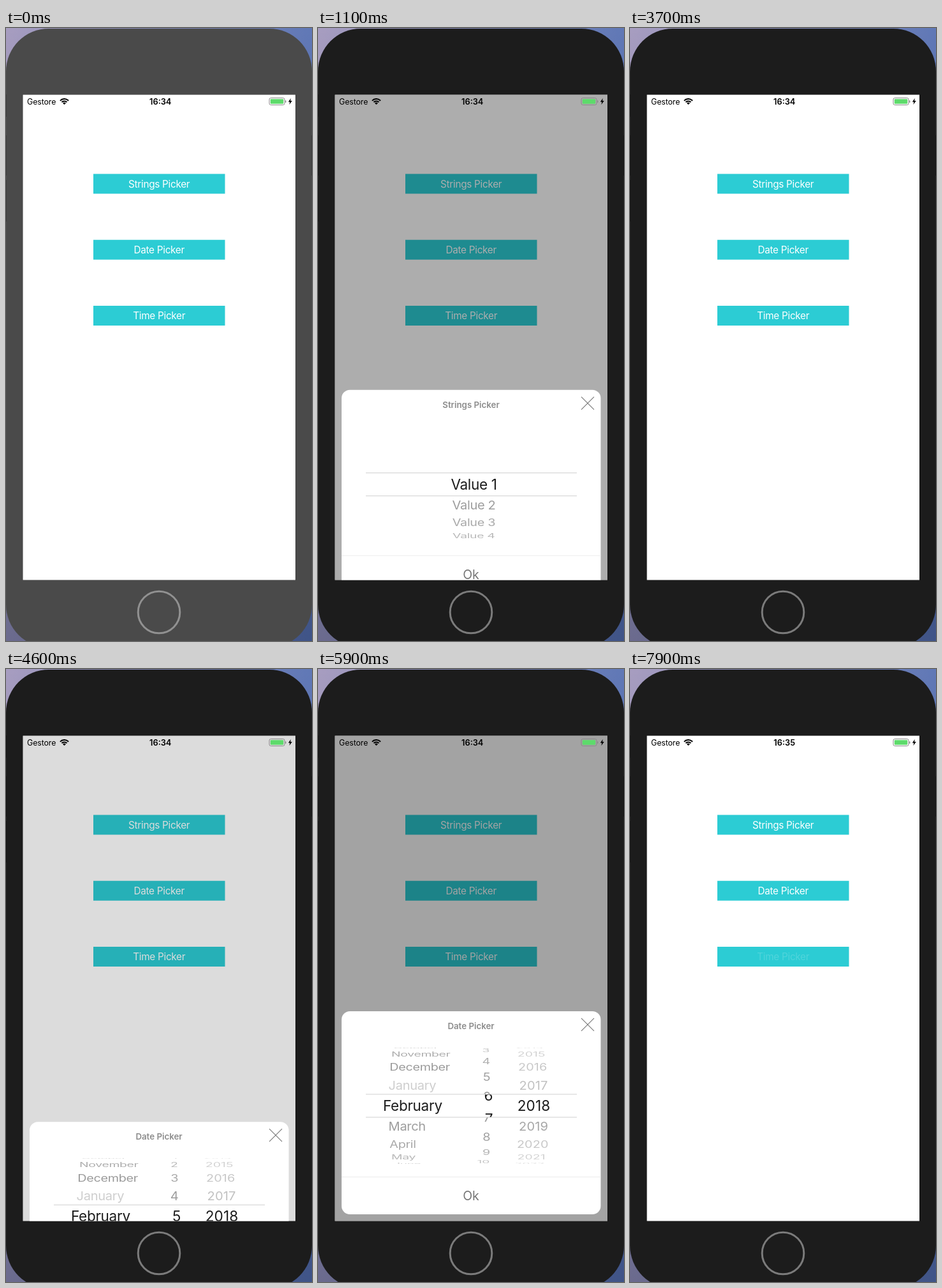
Recreate the animation shown at these times as an HTML page with a canvas. Size 480 px wide and 960 px high, loop 8 s.

```html
<!DOCTYPE html>
<html lang="it">
<head>
<meta charset="utf-8">
<title>Pickers</title>
<style>
html, body { margin: 0; width: 100%; height: 100%; overflow: hidden; }
canvas { display: block; width: 480px; height: 960px; }
</style>
</head>
<body>
<canvas id="stage"></canvas>
<script>
const LOOP = 8000, SLIDE = 328, DIM = 0.361;
const FONT = 'Inter, "Liberation Sans", sans-serif';
const MONTHS = ['January', 'February', 'March', 'April', 'May', 'June', 'July',
  'August', 'September', 'October', 'November', 'December'];

const canvas = document.getElementById('stage');
const ctx = canvas.getContext('2d');
const ratio = window.devicePixelRatio || 1;
canvas.width = 480 * ratio;
canvas.height = 960 * ratio;

const clamp = u => Math.min(1, Math.max(0, u));
const ease = u => 0.5 - 0.5 * Math.cos(Math.PI * clamp(u));
const tween = (t, from, to) => ease((t - from) / (to - from));
const wrap = (i, n) => ((i % n) + n) % n;

// x: column anchor, lens: anchor inside the selection band
const valueCol = {
  x: 244.5, lens: 244.5, align: 'center', spacing: -0.35,
  label: i => i >= 1 && i <= 4 ? 'Value ' + i : '',
  color: () => '#999'
};
const monthCol = {
  x: 110, lens: 102, align: 'left', spacing: -0.35,
  label: i => MONTHS[wrap(i, 12)],
  color: i => i === 0 ? '#ccc' : i < 0 ? '#888' : '#999'
};
const dayCol = {
  x: 271, lens: 274.5, align: 'right', spacing: 0,
  label: i => String(wrap(i - 1, 31) + 1),
  color: () => '#999'
};
const yearCol = {
  x: 338.5, lens: 338.5, align: 'center', spacing: 0.1,
  label: i => String(i),
  color: i => i === 2019 ? '#a2a2a2' : '#bebebe'
};

const buttons = [
  { text: 'Strings Picker', y: 228.5, down: 520, up: 720 },
  { text: 'Date Picker', y: 331.8, down: 4050, up: 4270 },
  { text: 'Time Picker', y: 435, down: 7770, up: 9000 }
];

const sheets = [
  { title: 'Strings Picker', open: 700, close: 3180,
    wheels: t => [[valueCol, 1 + 2 * tween(t, 2080, 2580)]] },
  { title: 'Date Picker', open: 4360, close: 6865,
    wheels: t => [[monthCol, 1], [dayCol, 5 + 2 * tween(t, 5450, 6150)], [yearCol, 2018]] }
];

function box(x, y, w, h, color, radius = 0) {
  ctx.fillStyle = color;
  ctx.beginPath();
  ctx.roundRect(x, y, w, h, radius);
  ctx.fill();
}

function clipBox(x, y, w, h) {
  ctx.beginPath();
  ctx.rect(x, y, w, h);
  ctx.clip();
}

// Text whose capitals are centred on y
function text(str, x, y, size, color, { weight = 400, align = 'center', spacing = 0 } = {}) {
  ctx.font = `${weight} ${size}px ${FONT}`;
  ctx.letterSpacing = spacing + 'px';
  ctx.textAlign = align;
  ctx.textBaseline = 'alphabetic';
  ctx.fillStyle = color;
  ctx.fillText(str, x, y + size * 0.364);
}

function backdrop() {
  const across = ctx.createLinearGradient(0, 0, 480, 0);
  across.addColorStop(0, '#a79dc0');
  across.addColorStop(1, '#6078b6');
  box(0, 0, 480, 960, across);
  const down = ctx.createLinearGradient(0, 0, 0, 960);
  down.addColorStop(0, 'rgba(10,25,60,0)');
  down.addColorStop(1, 'rgba(10,25,60,.38)');
  box(0, 0, 480, 960, down);
}

function phone(t) {
  const active = t >= 500;
  box(0, 1, 480, 969, active ? '#1c1c1c' : '#4a4a4a', 67);
  for (const [x, y, h] of [[0, 104, 35], [0, 168, 63], [0, 238, 65], [479, 168, 63]])
    box(x, y, 1, h, active ? '#111' : '#3a3a3a');
  ctx.strokeStyle = active ? '#7b7b7b' : '#919191';
  ctx.lineWidth = 3;
  ctx.beginPath();
  ctx.arc(240, 915, 32.8, 0, Math.PI * 2);
  ctx.stroke();
  box(26, 104, 428.5, 761, active ? '#111' : '#333');
  box(26.5, 104.5, 427.5, 760, '#fff');
}

function button(b, t) {
  box(137, b.y, 206.5, 31, '#2cccd4');
  const press = clamp((t - b.down) / 80) * (1 - tween(t, b.up, b.up + 300));
  ctx.globalAlpha = 1 - 0.83 * press;
  text(b.text, 240.2, b.y + 15.7, 15.3, '#fff', { spacing: -0.28 });
  ctx.globalAlpha = 1;
}

function rows(col, pos, cy, lens) {
  for (let i = Math.ceil(pos - 4.3); i <= pos + 4.3; i++) {
    const str = col.label(i);
    if (!str) continue;
    const angle = (i - pos) * 20.4 * Math.PI / 180;
    const flat = Math.cos(angle);
    const depth = 1 - 0.075 * (1 - flat);
    const x = lens ? col.lens : 240 + (col.x - 240) * depth;
    ctx.save();
    ctx.translate(x, cy + 92 * Math.sin(angle) * (lens ? 1.12 : 1));
    ctx.scale(depth, flat);
    if (!lens) ctx.globalAlpha = 0.4 + 0.6 * flat;
    text(str, 0, 0, lens ? 22.6 : 20.2, lens ? '#1c1c1c' : col.color(i),
      { align: col.align, spacing: col.spacing });
    ctx.restore();
  }
}

function wheel(col, pos, cy) {
  for (const [y, h, lens] of [[-91, 73, false], [18, 73, false], [-18, 36, true]]) {
    ctx.save();
    clipBox(38, cy + y, 404, h);
    rows(col, pos, cy, lens);
    ctx.restore();
  }
}

function cross(x, y, r) {
  ctx.strokeStyle = '#777';
  ctx.lineWidth = 1.1;
  ctx.beginPath();
  ctx.moveTo(x - r, y - r);
  ctx.lineTo(x + r, y + r);
  ctx.moveTo(x + r, y - r);
  ctx.lineTo(x - r, y + r);
  ctx.stroke();
}

function sheet(s, t) {
  const shown = tween(t, s.open, s.open + 500) - tween(t, s.close, s.close + 500);
  if (shown <= 0) return;
  const dim = Math.max(0, 1 - 1.18 * (1 - shown));
  box(26.5, 104.5, 427.5, 760, `rgba(0,0,0,${DIM * dim})`);

  const top = 536 + SLIDE * (1 - shown), cy = top + 148;
  box(37, top, 406.5, 318, '#fff', 13);
  text(s.title, 240, top + 23.2, 13.3, '#8c8c8c', { weight: 600 });
  cross(423, top + 20.8, 10);
  for (const [col, pos] of s.wheels(t)) wheel(col, pos, cy);
  box(75, cy - 18.5, 331, 1, '#cfcfcf');
  box(75, cy + 17.5, 331, 1, '#cfcfcf');
  box(37, top + 259, 406.5, 1, '#ececec');
  text('Ok', 240, top + 289, 19.6, '#777');
}

function wifi(x, y) {
  ctx.strokeStyle = '#000';
  ctx.lineWidth = 2;
  for (const r of [5.6, 9]) {
    ctx.beginPath();
    ctx.arc(x, y, r, -Math.PI * 0.76, -Math.PI * 0.24);
    ctx.stroke();
  }
  ctx.fillStyle = '#000';
  ctx.beginPath();
  ctx.moveTo(x, y);
  ctx.arc(x, y, 3.4, -Math.PI * 0.76, -Math.PI * 0.24);
  ctx.fill();
}

function statusBar(t) {
  text('Gestore', 33, 115.4, 12.4, '#000', { align: 'left', spacing: -0.1 });
  wifi(91.5, 120);
  text(t < 6000 ? '16:34' : '16:35', 242.2, 115.2, 12.8, '#000', { weight: 600 });

  ctx.strokeStyle = '#8a8a8a';
  ctx.lineWidth = 1;
  ctx.beginPath();
  ctx.roundRect(413, 109.5, 24, 11, 2.5);
  ctx.stroke();
  box(414.8, 111.2, 20.4, 7.6, '#5ddb6b', 1);
  box(438, 113.3, 1.4, 3.6, '#8a8a8a', 0.7);
  ctx.fillStyle = '#000';
  ctx.fill(new Path2D('M446.8 110 L442.8 115.8 H445.3 L444.4 120 L448.8 113.9 H446.2 Z'));
}

function draw(t) {
  ctx.setTransform(ratio, 0, 0, ratio, 0, 0);
  backdrop();
  phone(t);
  ctx.save();
  clipBox(26.5, 104.5, 427.5, 760);
  for (const b of buttons) button(b, t);
  for (const s of sheets) sheet(s, t);
  statusBar(t);
  ctx.restore();
}

const start = performance.now();
function tick() {
  draw((performance.now() - start) % LOOP);
  requestAnimationFrame(tick);
}
tick();
</script>
</body>
</html>
```
